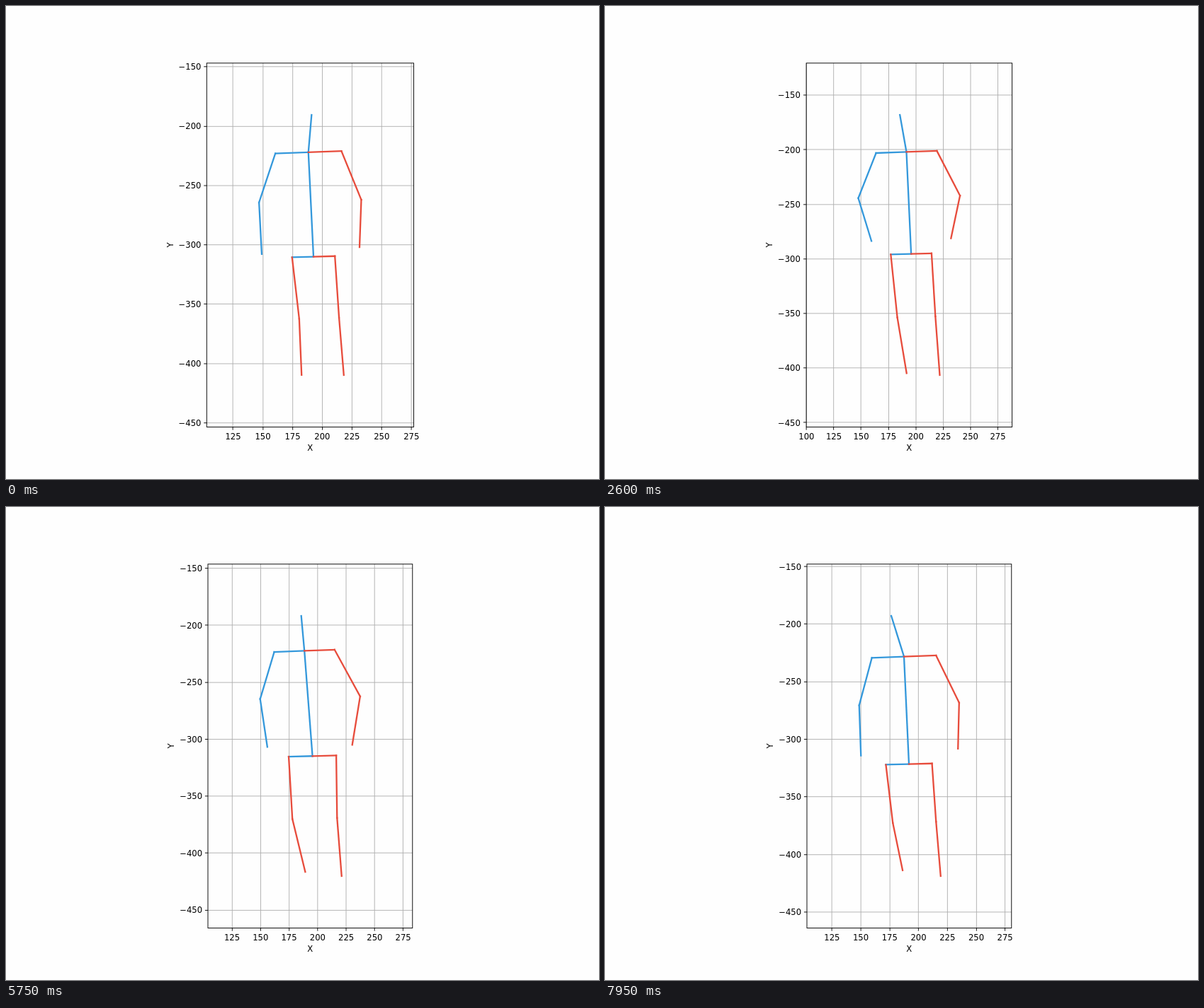
Write an HTML page that moves like this. It is 837x669 px and loops after 8 s.

```html
<!DOCTYPE html>
<html lang="en">
<head>
<meta charset="utf-8">
<title>Stick figure plot</title>
<style>
  html, body { margin: 0; width: 100%; height: 100%; overflow: hidden; background: #fefefe; }
  svg { display: block; }
  text { font: 11.62px "DejaVu Sans", sans-serif; fill: #000; }
  .grid { stroke: #b0b0b0; stroke-width: .93; }
  .axis { stroke: #000; stroke-width: .93; fill: none; }
  .bone { stroke-width: 2.3; stroke-linecap: square; }
</style>
</head>
<body>
<svg id="plot" width="837" height="669" viewBox="0 0 837 669"></svg>
<script>
const STEP = 50, LOOP = 8000, CELL = 2.77, DOT = .837;
const TOP = 80.4, BOTTOM = 595.5, CENTER = 429.3;
const BLUE = "#3498db", RED = "#e74c3c";

// x: neck position; neck, hip, foot: depth below zero;
// lean: head offset; reach: half elbow span; bend: forearm angle in degrees.
const poses = [
  { t: 0, x: 188.3, neck: 222, hip: 310, foot: 409.7, lean: 2.7, reach: 43, bend: 3 },
  { t: 1750, x: 187, neck: 201.3, hip: 291, foot: 404, lean: -8, reach: 47, bend: 36 },
  { t: 2600, x: 191.4, neck: 202, hip: 295.4, foot: 406.4, lean: -6, reach: 46.5, bend: 17 },
  { t: 3800, x: 189.2, neck: 219.4, hip: 308, foot: 409.6, lean: -4, reach: 40.4, bend: 5 },
  { t: 4900, x: 189.4, neck: 217.4, hip: 310.6, foot: 419.5, lean: 0, reach: 44.5, bend: 10 },
  { t: 6600, x: 190.2, neck: 227.4, hip: 319, foot: 420.7, lean: -8.3, reach: 43.1, bend: 7 },
  { t: 7950, x: 187.4, neck: 228.2, hip: 321.5, foot: 418.7, lean: -11, reach: 43.3, bend: 2 },
];

function rand(seed) {
  const s = Math.sin(seed * 127.1 + 31.7) * 43758.5453;
  return s - Math.floor(s);
}

function blend(t) {
  let k = 0;
  while (k < poses.length - 2 && t >= poses[k + 1].t) k++;
  const from = poses[k], to = poses[k + 1];
  const u = (t - from.t) / (to.t - from.t);
  const pose = { flicker: .65 * Math.sin(Math.PI * u) };
  for (const key in from) pose[key] = from[key] + (to[key] - from[key]) * u;
  return pose;
}

function skeleton(t) {
  const p = blend(t), progress = t / LOOP;
  // Arms open wide in the first second.
  const reach = p.reach + (t < 1000 ? 6 * Math.sin(Math.PI * t / 1000) ** 2 : 0);
  const armX = p.x + 1.5 + 3 * progress;
  const hipX = p.x + 4.3, hipHalf = 18 + 2 * progress;
  const hipL = hipX - hipHalf, hipR = hipX + hipHalf;
  const knee = p.hip + (p.foot - p.hip) * .52;
  const bend = p.bend * Math.PI / 180;
  const forearm = (x, y, length, angle) => [x + length * Math.sin(angle), y + length * Math.cos(angle)];

  const joints = {
    head: [p.x + p.lean, p.neck - 32.3 + .28 * p.lean],
    shoulderL: [p.x - 27.8, p.neck + 1],
    shoulderR: [p.x + 27.8, p.neck - 1],
    elbowL: [armX - reach, p.neck + 42.3],
    elbowR: [armX + reach, p.neck + 40],
    wristL: forearm(armX - reach, p.neck + 42.3, 44 - .17 * p.bend, bend),
    wristR: forearm(armX + reach, p.neck + 40, 40, -.7 * bend),
    hipL: [hipL, p.hip + .5],
    hipR: [hipR, p.hip - .5],
    kneeL: [hipL + 6, knee + .5],
    kneeR: [hipR + 3.5, knee - .5],
    ankleL: [hipL + 8 + 6.5 * Math.min(1, t / 2000), p.foot - 5 * progress],
    ankleR: [hipR + 7.5, p.foot],
  };

  // Tracker flicker: now and then a joint hops by one cell.
  let seed = t / STEP * 26;
  for (const joint of Object.values(joints))
    for (const d of [0, 1])
      joint[d] += CELL * Math.round((rand(seed++) * 2 - 1) * p.flicker);
  return joints;
}

const mid = (a, b) => [(a[0] + b[0]) / 2, (a[1] + b[1]) / 2];
const crisp = v => (Math.floor(v / DOT) + .5) * DOT;
const line = (cls, x1, y1, x2, y2, extra = "") =>
  `<line class="${cls}" x1="${x1}" y1="${y1}" x2="${x2}" y2="${y2}" ${extra}/>`;
const label = (s, x, y, anchor, extra = "") =>
  `<text x="${x}" y="${y}" text-anchor="${anchor}" ${extra}>${s}</text>`;

function ticks(lo, hi, step) {
  const out = [];
  for (let v = Math.ceil(lo / step) * step; v <= hi; v += step) out.push(v);
  return out;
}

function draw(t) {
  const j = skeleton(t), points = Object.values(j);
  const xs = points.map(p => p[0]), ys = points.map(p => p[1]);
  const yMin = Math.min(...ys), yMax = Math.max(...ys);
  const xMin = Math.min(...xs), xMax = Math.max(...xs);

  // Equal aspect, padded on every side by a fifth of the height.
  const pad = (yMax - yMin) * .2;
  const scale = (BOTTOM - TOP) / (yMax - yMin + 2 * pad);
  const half = ((xMax - xMin) / 2 + pad) * scale;
  const px = x => CENTER + (x - (xMin + xMax) / 2) * scale;
  const py = y => TOP + (y - yMin + pad) * scale;
  const left = crisp(CENTER - half), right = crisp(CENTER + half);
  const top = crisp(TOP), bottom = crisp(BOTTOM);

  let grid = "", marks = "", bones = "";
  for (const v of ticks(xMin - pad, xMax + pad, 25)) {
    const x = crisp(px(v));
    grid += line("grid", x, top, x, bottom);
    marks += line("axis", x, bottom, x, bottom + 4.07) + label(v, px(v), 612.6, "middle");
  }
  for (const v of ticks(yMin - pad, yMax + pad, 50)) {
    const y = crisp(py(v));
    grid += line("grid", left, y, right, y);
    marks += line("axis", left, y, left - 4.07, y) +
      label("\u2212" + v, CENTER - half - 8.1, py(v) + 4.3, "end");
  }

  const neck = mid(j.shoulderL, j.shoulderR), hip = mid(j.hipL, j.hipR);
  const chain = (color, ...pts) => {
    for (let i = 1; i < pts.length; i++) {
      const [a, b] = [pts[i - 1], pts[i]];
      bones += line("bone", px(a[0]), py(a[1]), px(b[0]), py(b[1]), `stroke="${color}"`);
    }
  };
  chain(BLUE, j.head, neck, hip);
  chain(BLUE, neck, j.shoulderL, j.elbowL, j.wristL);
  chain(BLUE, hip, j.hipL);
  chain(RED, neck, j.shoulderR, j.elbowR, j.wristR);
  chain(RED, hip, j.hipR, j.kneeR, j.ankleR);
  chain(RED, j.hipL, j.kneeL, j.ankleL);

  const yx = CENTER - half - 47.8;
  plot.innerHTML = grid + bones +
    `<rect class="axis" x="${left}" y="${top}" width="${right - left}" height="${bottom - top}"/>` +
    marks + label("X", CENTER, 629.2, "middle") +
    label("Y", yx, 337.9, "middle", `transform="rotate(-90 ${yx} 337.9)"`);
}

const plot = document.getElementById("plot");
const start = performance.now();
let shown = -1;

function tick() {
  const t = Math.floor((performance.now() - start) % LOOP / STEP) * STEP;
  if (t !== shown) draw(shown = t);
  requestAnimationFrame(tick);
}
tick();
</script>
</body>
</html>
```
